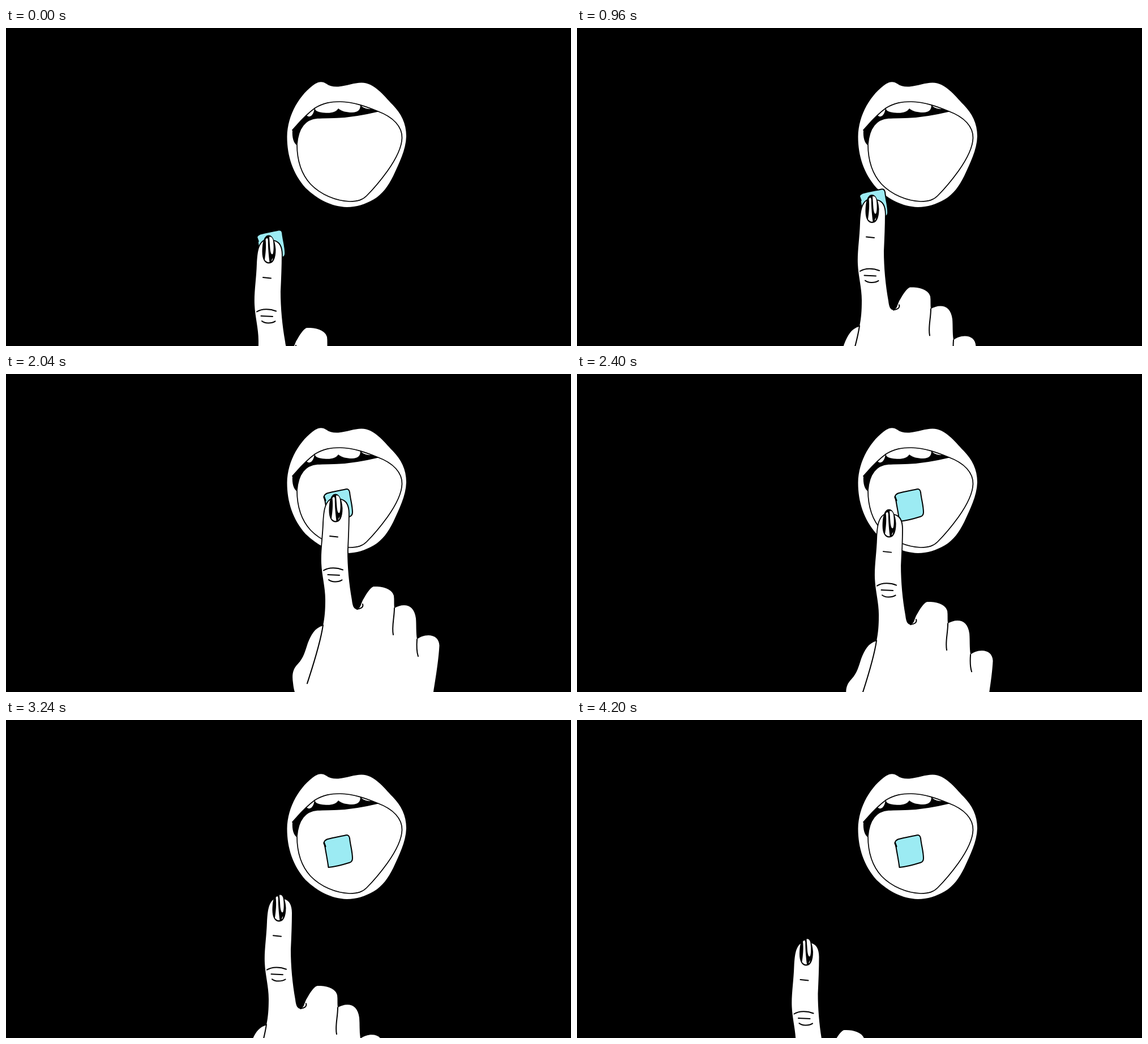
An HTML page with a canvas for the animation above (4.62 s loop, 998 px wide and 561 px high).

```html
<!DOCTYPE html>
<html lang="en">
<head>
<meta charset="utf-8">
<title>Finger and tongue</title>
<style>
  html, body { margin: 0; width: 100%; height: 100%; overflow: hidden; background: #000; }
  canvas { display: block; }
</style>
</head>
<body>
<canvas id="stage" width="998" height="561"></canvas>
<script>
const ctx = document.getElementById('stage').getContext('2d');
const LOOP = 4620, STEP = 60, LAST = 4200, LAND = 2040;
const WHITE = '#fff', BLACK = '#000', CYAN = '#9cebf3';
const path = d => new Path2D(d);

const lips = path(`M496.500 192 C497 152 520 116 546 98.500 C553 94 560 94 566 98.500
  C571 102.500 578 104 587 103.500 C602 102 615 96.500 628 96.500
  C651 97 666 118 683 135.500 C698 151 707 168 707 191
  C706.500 215 694 239 684 261 C675 279 665 293 650 302
  C634 311 619 316 602 316 C575 315 551 303 529 282
  C507 257 496.500 226 496.500 192 Z`);

const gap = path(`M506 180 C516 169 528 154 546 141 C561 132 574 130 590 130
  C615 130.500 637 139 657 147 C636 152 611 157 585 158
  C571 158.500 561 158 550 159 C526 161 515 181 514 207
  C508 203 505 193 506 180 Z`);

const tongue = path(`M657 147 C684 157 700 174 699.500 194
  C699 212 686 235 674 252 C661 270 649 284 637 296
  C630 303 622 306 607 306 C582 305 556 294 538 275.500
  C521 257 514 232 514 205 C516 180 526 161 550 159
  C561 158 571 158.500 585 158 C611 157 636 152 657 147 Z`);

const teeth = path(`M530 153 C533 157 537 157 540 154 C543 151 544 147 545 141 L540 136 Z
  M547 125 L546 143 C547 147 554 149 562 149.500 C574 150.500 582 149 587 142
  C593 147 602 149 611 149 C622 149 626 144 626 136 L626 125 Z
  M628 125 L628 138 C633 142 638 143 646 143 L650 130 Z`);

const archLine = path(`M506 180 C516 169 528 154 546 141 C561 132 574 130 590 130
  C615 130.500 637 139 657 147`);

const tab = path(`M563 220.500 C561 217 561 213.500 567 210.500 C577 207.500 590 205.500 600 203.300
  Q606 202 607 208.500 C608 220 612 232 612 244 Q612 250 607 251.500
  C596 255 583 259 569.500 260 C568 247 565 234 563 220.500 Z`);
const tabNotch = path('M561.800 217 L564 223');

const hand = path(`M573 222 C563 229 562 246 561 262 C560 290 556 313 557 334
  C558 356 564 376 564 398 C564 417 563 429 560 444
  C545 448 539 460 533 475 C528 490 526 500 516 511
  C506 521 505 531 507 545 Q508 555 510 561 L516 720 L735 720
  L755 561 C758 541 764 507 765.500 479 C765 467 757 461 746 461
  C738 461 731 464 726 468 C724 455 725 443 724 431
  C722 415 714 408 703 408 C697 408 691 410 686 413
  C685 405 686 398 685 391 C682 379 665 374 649 375
  C643 377 636 389 632 396 C627 403 627 414 620 415
  C614 415 612 408 611 399 C606 371 603 340 603 311
  C604 288 605 266 605 246 C605 232 600 224 592 222 Z`);

const creases = path(`M560 443 C555 477 541 518 532 546
  M686 413 C686 430 681 446 684 460
  M726 468 C725 481 725 489 728 498
  M630 406 C632 412 626 414 620 415
  M572 286 L586 287.500
  M561 346.500 C570 341 584 341 595 345.500
  M568.500 354 C576 354.500 582 354.500 589 355
  M570 363 C575 367.500 587 367.500 593.500 363.300`);

const nail = path(`M570.500 241 C570.500 224 574 211.500 582 211.500 C590 211.500 593.500 224 594.500 237
  C594.500 253 590 261.500 582.500 261.500 C575 261.500 570.500 254 570.500 241 Z`);
const shine = path(`M576.500 219 Q580 214 580.800 220 C580.800 235 582 247 583.500 259
  Q579 260 575 255 C576.500 244 578 231 576.500 219 Z
  M583 214.500 Q588.500 213 590 222 C591 231 591 239 589.500 244
  C587 248 585 241 584.500 235 Z
  M586.500 257 L589.500 251 L588.500 256 Z`);

// [time, x, y] relative to the pose with the finger on the tongue
const handKeys = [
  [0, -118, 154], [960, -61, 82.5], [1440, -32, 46.5], [1980, 0, 5],
  [2040, 0, 0], [2160, -10.5, 8], [2760, -61.5, 55.8],
  [3240, -100, 94.2], [4200, -177.5, 172]
];

function track(keys, t) {
  let i = 1;
  while (i < keys.length - 1 && t > keys[i][0]) i++;
  const [t0, x0, y0] = keys[i - 1], [t1, x1, y1] = keys[i];
  const k = (t - t0) / (t1 - t0);
  return [x0 + (x1 - x0) * k, y0 + (y1 - y0) * k];
}

function fill(shape, color) {
  ctx.fillStyle = color;
  ctx.fill(shape);
}

function line(shape, width = 2) {
  ctx.lineWidth = width;
  ctx.stroke(shape);
}

function at([x, y], paint) {
  ctx.save();
  ctx.translate(x, y);
  paint();
  ctx.restore();
}

function drawMouth() {
  fill(lips, WHITE);
  fill(gap, BLACK);
  ctx.save();
  ctx.clip(gap);
  fill(teeth, WHITE);
  ctx.restore();
  fill(tongue, WHITE);
  line(tongue, 1.7);
  line(archLine, 1.7);
}

function drawTab() {
  fill(tab, CYAN);
  line(tab);
  line(tabNotch, 3);
}

function drawHand() {
  line(hand, 3.6); // the fill covers the inner half, leaving an outer contour
  fill(hand, WHITE);
  line(creases);
  fill(nail, BLACK);
  fill(shine, WHITE);
}

function draw(t) {
  ctx.fillStyle = BLACK;
  ctx.fillRect(0, 0, 998, 561);
  ctx.strokeStyle = BLACK;
  ctx.lineCap = ctx.lineJoin = 'round';
  drawMouth();
  const left = Math.max(0, 1 - t / LAND);
  at([-118.8 * left, 153.3 * left], drawTab);
  at(track(handKeys, t), drawHand);
}

const start = performance.now();
function tick(now) {
  const t = Math.max(0, now - start) % LOOP;
  draw(Math.min(LAST, Math.floor(t / STEP) * STEP));
  requestAnimationFrame(tick);
}
draw(0);
requestAnimationFrame(tick);
</script>
</body>
</html>
```
